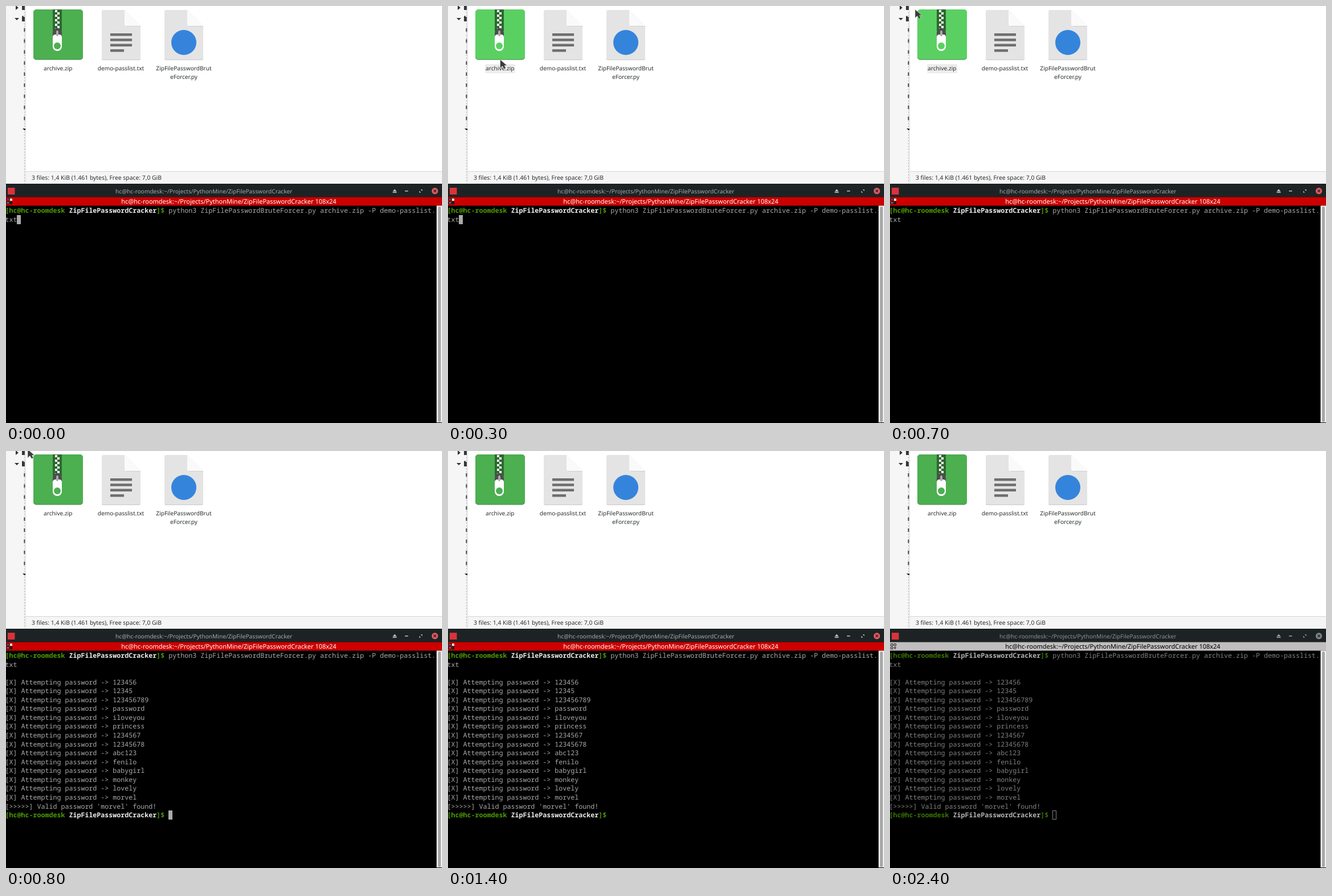
These frames come from a looping animation (765x732 px, 2500 ms). An HTML page:

```html
<!DOCTYPE html>
<html lang="en">
<head>
<meta charset="utf-8">
<title>Zip password demo</title>
<style>
  html, body { margin: 0; width: 100%; height: 100%; overflow: hidden; background: #fff; }
  svg { display: block; width: 765px; height: 732px; }
  text { white-space: pre; text-rendering: geometricPrecision; }
  .ui { font: 10.15px "Noto Sans", sans-serif; fill: #2a2e30; }
  .mid { text-anchor: middle; }
  .status { font-size: 10.36px; }
  #terminal {
    --bar: #cc0000; --bar-text: #fff; --title: #a4abad; --text: #aaa;
    --green: #4e9a06; --bold: #eee; --close: #e05a62; --button: #c3c9ca;
  }
  #terminal.blurred {
    --bar: #c0bebf; --bar-text: #000; --title: #899193; --text: #808080;
    --green: #3a7305; --bold: #b3b3b3; --close: #7d8587; --button: #a0a7a9;
  }
  .title { fill: var(--title); }
  .bar { fill: var(--bar); }
  .bar-text { font-size: 11px; fill: var(--bar-text); }
  .mono { font: 11.667px "Noto Sans Mono", monospace; fill: var(--text); }
  .user { fill: var(--green); font-weight: bold; }
  .dir { fill: var(--bold); font-weight: bold; }
  .button { fill: var(--button); }
  .close { fill: var(--close); }
  .cursor { fill: #aaa; }
  .blurred .cursor { fill: none; stroke: #808080; }
  .blurred .focused-icon, #terminal:not(.blurred) .blurred-icon { display: none; }
  .zip-color { fill: #4caf50; }
  .hover .zip-color { fill: #5bd062; }
  #labelGlow { fill: none; }
  .hover #labelGlow { fill: #ededed; }
</style>
</head>
<body>
<svg viewBox="0 0 765 732">
  <defs>
    <g id="page">
      <path d="M3 7H40L68 35V92Q68 95 65 95H3Q0 95 0 92V10Q0 7 3 7Z" fill="#e4e4e4"/>
      <path d="M0 91V92Q0 95 3 95H65Q68 95 68 92V91Q68 94 65 94H3Q0 94 0 91Z" fill="#c9c9c9"/>
      <path d="M40 7L68 35H43Q40 35 40 32Z" fill="#fafafa"/>
      <path d="M42 35H68V36H44Z" fill="#cfcfcf"/>
    </g>
  </defs>

  <rect width="765" height="312" fill="#fff"/>
  <rect width="34" height="312" fill="#f6f6f6"/>
  <rect x="35" y="290" width="730" height="22" fill="#f5f5f5"/>
  <path d="M35 290.5H765" stroke="#d6d6d6"/>
  <path d="M32.5 0V311" stroke="#b5b9ba" stroke-dasharray="3 2"/>
  <path d="M34.5 0V311" stroke="#dedede"/>
  <path d="M17 -1L22 3L17 7ZM15 21H23L19 25ZM29 215H34V218H32Z" fill="#333"/>
  <path d="M28 0H33V7H28ZM28 18L30 17L31 19H33V27H28Z" fill="#36393a"/>
  <g id="sideMarks" fill="#333"></g>

  <g id="archive">
    <rect x="48" y="7" width="87" height="87.5" rx="5" fill="#3d8b40"/>
    <rect class="zip-color" x="48" y="6" width="87" height="87.5" rx="5"/>
    <rect x="82" y="6" width="16" height="38" fill="#2d6830"/>
    <g id="teeth" fill="#fff"></g>
    <path d="M82 54V47Q82 44 86 40Q90 37 94 40Q98 44 98 47V54Z" fill="#4d4d4d"/>
    <path d="M82 71V55Q82 50 87 50H93Q98 50 98 55V71A8 8 0 0 1 82 71Z" fill="#fff"/>
    <rect x="88" y="43" width="4" height="10" rx="2" fill="#aaa"/>
    <circle class="zip-color" cx="90" cy="70" r="6"/>
    <rect id="labelGlow" x="65" y="102" width="53" height="16" rx="2"/>
  </g>

  <use href="#page" x="168"/>
  <path d="M183 48H221V52.5H183ZM183 57.3H221V61.8H183ZM183 66.6H221V71.1H183ZM183 76H207V80.5H183Z" fill="#6f6f6f"/>
  <use href="#page" x="278"/>
  <circle cx="312" cy="64" r="22" fill="#3584dc"/>

  <g class="ui">
    <g class="mid">
      <text x="91.3" y="113">archive.zip</text>
      <text x="201.5" y="113">demo-passlist.txt</text>
      <text x="312" y="113">ZipFilePasswordBrut</text>
      <text x="312" y="128">eForcer.py</text>
    </g>
    <text class="status" x="45" y="305">3 files: 1,4 KiB (1.461 bytes), Free space: 7,0 GiB</text>
  </g>

  <g id="terminal">
    <rect y="312" width="765" height="420" fill="#000"/>
    <rect y="312" width="765" height="23.5" fill="#1d2324"/>
    <rect y="312" width="765" height="1" fill="#14191a"/>
    <rect x="3" y="319" width="12.5" height="12" fill="#d9333b"/>
    <text id="title" class="ui mid title" x="347.3" y="328.6"></text>
    <path class="button" d="M678.5 325.5L682 321.5L685.5 325.5ZM678.5 326.5H685.5V328H678.5ZM700 324H705.5V325.5H700ZM727.5 322H730.5V325ZM725 324.5V327.5H728Z"/>
    <circle class="close" cx="752.5" cy="324.7" r="5.6"/>
    <path d="M750.3 322.5L754.7 326.9M754.7 322.5L750.3 326.9" stroke="#1d2324" stroke-width="1.3"/>

    <rect class="bar" y="335.5" width="765" height="15"/>
    <g class="focused-icon">
      <path d="M1 338H6V342H1ZM1 343H6V348H1ZM7 343H11V348H7Z" fill="#171717"/>
      <path d="M7 338H11V342H7Z" fill="#e8e8e8"/>
      <path d="M2 339H5V341H2ZM2 344H5V347H2Z" fill="#4b79aa"/>
    </g>
    <path class="blurred-icon" d="M1.5 338.5H5V342H1.5ZM7 338.5H10.5V342H7ZM1.5 344H5V347.5H1.5ZM6.5 345.5H11M8.8 343.5V348" fill="none" stroke="#222"/>
    <text id="barTitle" class="ui mid bar-text" x="391" y="347"></text>

    <rect x="755.5" y="350.5" width="9.5" height="380.5" fill="#f2f2f2"/>
    <rect x="758" y="352" width="5" height="378.5" rx="2.5" fill="#a6a8a8"/>
    <g id="command" class="mono"></g>
    <g id="output" class="mono"></g>
    <rect id="cursor" class="cursor"/>
  </g>

  <path id="pointer" d="M0 0V15L4 11.5L7 16.5L10 15L7.5 10.5H12Z" fill="#3b3b3b" stroke="#ddd" stroke-width=".6"/>
</svg>
<script>
const LOOP = 2500, STEP = 100;
const CELL = 7, LINE = 15.56, LEFT = -1.5, BASE = 363;
const $ = id => document.getElementById(id);

const host = "hc@hc-roomdesk", folder = "ZipFilePasswordCracker";
const path = `${host}:~/Projects/PythonMine/${folder}`;
const prompt = `<tspan class="user">[${host} </tspan><tspan class="dir">${folder}</tspan><tspan class="user">]$</tspan> `;
const passwords = ["123456", "12345", "123456789", "password", "iloveyou", "princess", "1234567",
  "12345678", "abc123", "fenilo", "babygirl", "monkey", "lovely", "morvel"];
const line = (row, text) => `<text x="${LEFT}" y="${BASE + row * LINE}">${text}</text>`;
const block = (x, y, w, h) => `<rect x="${x}" y="${y}" width="${w}" height="${h}"/>`;

$("title").textContent = path;
$("barTitle").textContent = path + " 108x24";
$("command").innerHTML =
  line(0, prompt + "python3 ZipFilePasswordBruteForcer.py archive.zip -P demo-passlist.") + line(1, "txt");
$("output").innerHTML =
  passwords.map((word, i) => line(3 + i, `[X] Attempting password -&gt; ${word}`)).join("") +
  line(17, "[&gt;&gt;&gt;&gt;&gt;] Valid password 'morvel' found!") + line(18, prompt);
$("teeth").innerHTML = Array.from({ length: 9 }, (_, i) => block(i % 2 ? 90 : 86, 7 + i * 4, 4, 4)).join("");
$("sideMarks").innerHTML = Array.from({ length: 9 }, (_, i) => block(31.5, 39 + i * 19.4, 1.8, 6)).join("");

// Pointer tip at each step, from 100 ms on
const tips = [[124, 230], [107, 150], [91.5, 94], [76, 62], [62, 36], [51, 16], [44, 6], [38, -3], [33, -8], [30, -12]];

function show(id, visible) {
  $(id).style.display = visible ? "" : "none";
}

function placeCursor(column, row, hollow) {
  const inset = hollow ? 0.5 : 0;
  const box = {
    x: Math.floor(LEFT + column * CELL) + inset,
    y: Math.round(BASE + row * LINE - 12) + inset,
    width: 7 - 2 * inset,
    height: 16 - 2 * inset
  };
  for (const key in box) $("cursor").setAttribute(key, box[key]);
}

function draw(t) {
  const done = t >= 800, blurred = t >= 2400;
  const tip = tips[Math.floor(t / STEP) - 1];
  show("pointer", tip);
  if (tip) $("pointer").setAttribute("transform", `translate(${tip})`);
  $("archive").classList.toggle("hover", t >= 300 && t < 800);
  $("terminal").classList.toggle("blurred", blurred);
  show("output", done);
  show("cursor", done ? t < 1400 || t >= 2000 : t < 500);
  placeCursor(done ? 41 : 3, done ? 18 : 1, blurred);
}

function tick() {
  draw(performance.now() % LOOP);
  requestAnimationFrame(tick);
}
tick();
</script>
</body>
</html>
```
